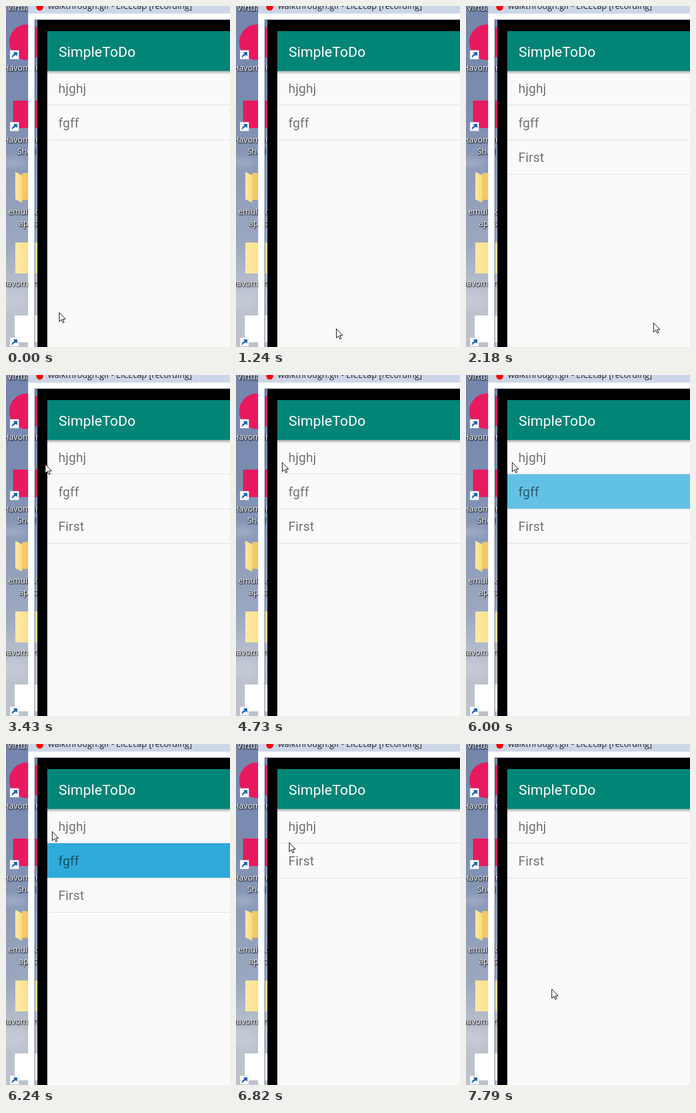
Recreate the animation shown at these times as an HTML page. Size 385 px wide and 584 px high, loop 8000 ms.

```html
<!DOCTYPE html>
<html lang="en">
<head>
<meta charset="utf-8">
<title>Simple to-do list</title>
<style>
  html, body { margin: 0; width: 100%; height: 100%; overflow: hidden; background: #fafafa; }
  svg { display: block; }

  .label { font: 14.2px "Open Sans", "Noto Sans", sans-serif; fill: #fff; text-anchor: middle;
    text-shadow: 1px 1px 2px #000, 0 1px 2px rgba(0, 0, 0, .7); }
  .caption { font: 14.5px "Open Sans", "Noto Sans", sans-serif; fill: #222; }
  .title { font: 24.3px Roboto, sans-serif; letter-spacing: .12px; fill: #fff; }
  .item { font: 22px Roboto, sans-serif; letter-spacing: .15px; fill: rgba(0, 0, 0, .54); }
  .rule { fill: #dfdfdf; }

  #cursor, #second, #third, #press { animation: 8s step-end infinite; }
  #cursor { animation-name: point; }
  #second { animation-name: remove; }
  #third { animation-name: add; }
  #press { animation-name: press; }

  @keyframes remove {
    0% { visibility: visible; }
    79.875%, 100% { visibility: hidden; }
  }
  @keyframes add {
    0% { visibility: hidden; transform: none; }
    27.25% { visibility: visible; transform: none; }
    79.875%, 100% { visibility: visible; transform: translateY(-59px); }
  }
  @keyframes press {
    0% { fill: transparent; }
    73.375% { fill: #7ccceb; }
    75% { fill: #62c2e5; }
    76.5% { fill: #48b7df; }
    78% { fill: #2eabda; }
    79.875%, 100% { fill: transparent; }
  }
  @keyframes point {
    0% { transform: translate(91px, 524px); }
    6.25% { transform: translate(93px, 524px); }
    11.75% { transform: translate(154px, 552px); }
    13.625% { transform: translate(161px, 553px); }
    15.5% { transform: translate(172px, 552px); }
    17% { transform: translate(187px, 550px); }
    18.875% { transform: translate(235px, 543px); }
    20.5% { transform: translate(286px, 540px); }
    22% { transform: translate(315px, 542px); }
    23.875% { transform: translate(319px, 542px); }
    25.5% { transform: translate(322px, 542px); }
    28.75% { transform: translate(310px, 541px); }
    30.625% { transform: translate(250px, 538px); }
    32.125% { transform: translate(209px, 537px); }
    34% { transform: translate(189px, 537px); }
    39% { transform: translate(167px, 497px); }
    41% { transform: translate(67px, 198px); }
    42.875% { transform: translate(67px, 152px); }
    44.375% { transform: translate(79px, 160px); }
    45.875% { transform: translate(87px, 171px); }
    47.75% { transform: translate(83px, 180px); }
    49.25% { transform: translate(76px, 185px); }
    50.75% { transform: translate(73px, 184px); }
    52.625% { transform: translate(71px, 183px); }
    54.25% { transform: translate(70px, 181px); }
    56% { transform: translate(73px, 164px); }
    57.5% { transform: translate(77px, 153px); }
    59.125% { transform: translate(79px, 149px); }
    85.25% { transform: translate(91px, 168px); }
    86.75% { transform: translate(113px, 209px); }
    88.625% { transform: translate(148px, 329px); }
    90.5% { transform: translate(177px, 354px); }
    92% { transform: translate(174px, 368px); }
    93.875% { transform: translate(162px, 391px); }
    95.75% { transform: translate(154px, 405px); }
    97.375%, 100% { transform: translate(147px, 419px); }
  }
</style>
</head>
<body>
<svg width="385" height="584" viewBox="0 0 385 584">
  <defs>
    <linearGradient id="sky" x2="0" y2="1">
      <stop offset="0" stop-color="#7486ad"/>
      <stop offset=".3" stop-color="#7b8cb1"/>
      <stop offset=".5" stop-color="#8d9cba"/>
      <stop offset=".7" stop-color="#9ca8c0"/>
      <stop offset=".84" stop-color="#bcc3cf"/>
      <stop offset="1" stop-color="#bcc1cc"/>
    </linearGradient>
    <linearGradient id="shade" x2="0" y2="1">
      <stop offset="0" stop-opacity=".3"/>
      <stop offset="1" stop-opacity="0"/>
    </linearGradient>
    <linearGradient id="paper" x2="1" y2="0">
      <stop offset="0" stop-color="#ffe9a6"/>
      <stop offset="1" stop-color="#fbd978"/>
    </linearGradient>
    <filter id="soft"><feGaussianBlur stdDeviation="6"/></filter>
    <g id="shortcut">
      <rect width="15" height="15" fill="#fff" stroke="#c8ccd2" stroke-width=".6"/>
      <path d="M3 13Q2.600 7.500 7.500 6L5.500 3H12.500V10L10 8Q6 9 3 13Z" fill="#1b62b5"/>
    </g>
  </defs>

  <!-- desktop -->
  <rect width="54" height="584" fill="url(#sky)"/>
  <g fill="#d0d5de" opacity=".4" filter="url(#soft)">
    <ellipse cx="8" cy="268" rx="26" ry="6"/>
    <ellipse cx="6" cy="505" rx="30" ry="14"/>
  </g>
  <circle cx="36" cy="62" r="30.500" fill="#e8195f"/>
  <rect x="12" y="162" width="47" height="47" fill="#e8195f"/>
  <path d="M28 286H49V332H28Z" fill="#f3c866"/>
  <path d="M16 284L28 290V337L16 331Z" fill="url(#paper)"/>
  <rect x="16" y="405" width="44" height="53" fill="url(#paper)"/>
  <rect x="15" y="530" width="46" height="46" fill="#fff"/>
  <use href="#shortcut" x="7" y="76"/>
  <use href="#shortcut" x="7" y="199"/>
  <use href="#shortcut" x="7" y="568"/>
  <g class="label">
    <text x="36" y="8">VirtualBox</text>
    <text x="36" y="111">Havomurion</text>
    <text x="36" y="234">Havomurion</text>
    <text x="35" y="254">Shell</text>
    <text x="34" y="357">emulator</text>
    <text x="38" y="377">apps</text>
    <text x="33" y="480">havomurion</text>
  </g>

  <!-- recorder window -->
  <path d="M38 0H385V24H49V584H38Z" fill="#fff"/>
  <rect x="38" width="347" height="13" fill="#ccd6e6"/>
  <path d="M385 23.500H49.500V584" fill="none" stroke="#5f7594"/>
  <circle cx="58" cy="2" r="6" fill="#f00"/>
  <text class="caption" x="72" y="5">walkthrough.gif - LICEcap [recording]</text>

  <!-- app -->
  <path d="M54 24H385V584H54Z"/>
  <rect x="71" y="43" width="314" height="541" fill="#fafafa"/>
  <rect x="71" y="43" width="314" height="68.400" fill="#008577"/>
  <rect x="71" y="111.400" width="314" height="6" fill="url(#shade)"/>
  <text class="title" x="90.500" y="87">SimpleToDo</text>

  <text class="item" x="90" y="148.500">hjghj</text>
  <rect class="rule" x="71" y="169" width="314" height="1"/>
  <rect id="press" x="71" y="170" width="314" height="59" fill="transparent"/>
  <g id="second">
    <text class="item" x="90" y="208">fgff</text>
    <rect class="rule" x="71" y="229" width="314" height="1"/>
  </g>
  <g id="third">
    <text class="item" x="90" y="267">First</text>
    <rect class="rule" x="71" y="288" width="314" height="1"/>
  </g>

  <path id="cursor" d="M.5 .8V16.500L4.200 13L6.700 18.500L8.900 17.500L6.500 12.200H11.300Z" fill="#fff" stroke="#000"/>
</svg>
</body>
</html>
```
